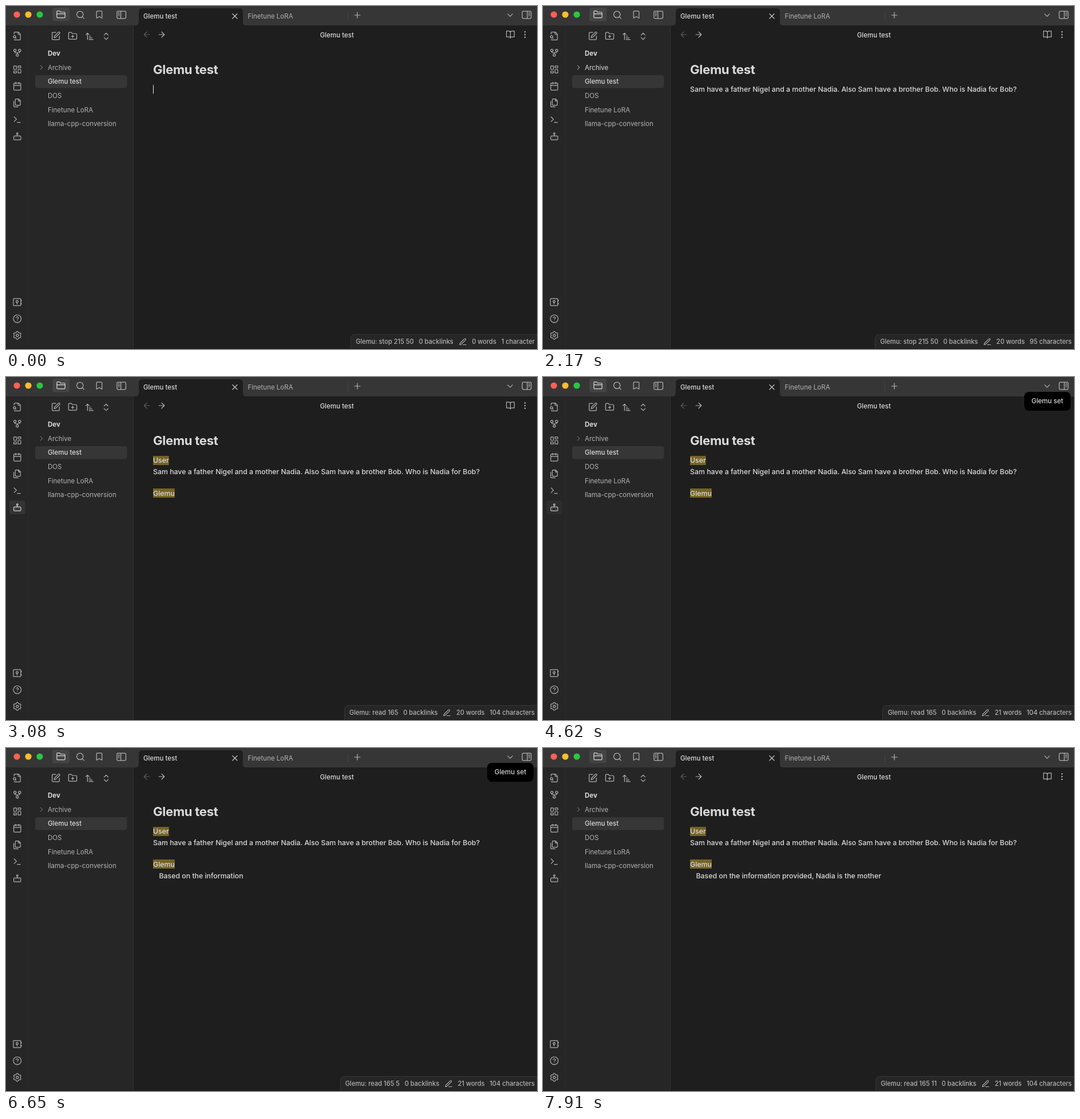
These frames come from a looping animation (928x600 px, 8000 ms). An HTML page:

```html
<!DOCTYPE html>
<html lang="en">
<head>
<meta charset="utf-8">
<title>Notes</title>
<style>
  html, body { margin: 0; width: 100%; height: 100%; overflow: hidden; background: #1e1e1e; }
  body, svg text { font-family: Inter, "Open Sans", sans-serif; }
  #stage { position: absolute; left: 0; top: 0; width: 928px; height: 600px; overflow: hidden; }
  svg { display: block; }
  text { white-space: pre; fill: #dadada; font-size: 11.5px; font-weight: 500; }
  .muted { fill: #b3b3b3; font-weight: 400; }
  .body { font-size: 12.3px; }
  .bold { font-weight: 700; }
  .title { font-size: 22.2px; font-weight: 700; letter-spacing: -.015em; }
  .icon { fill: none; stroke-width: 1.75; stroke-linecap: round; stroke-linejoin: round; }
  #status {
    position: absolute; right: 0; bottom: 1px; height: 24px; padding: 0 4px 0 8px;
    display: flex; align-items: center; gap: 8.7px; white-space: pre;
    background: #262626; border: solid #363636; border-width: 1px 0 0 1px;
    border-radius: 8px 0 0 0; color: #b3b3b3; font-size: 11.1px; font-weight: 500; line-height: 24px;
  }
  #toast {
    position: absolute; left: 841px; top: 26px; width: 81px; height: 33px;
    border-radius: 8px; background: #000; color: #dadada;
    font-size: 11.5px; font-weight: 500; line-height: 33px; text-align: center;
  }
</style>
</head>
<body>
<div id="stage">
  <svg id="scene" width="928" height="600" viewBox="0 0 928 600"></svg>
  <div id="status">
    <span id="state"></span><span id="links">0 backlinks</span>
    <svg id="pencil" width="15" height="15" viewBox="0 0 24 24"></svg>
    <span id="words"></span><span id="chars"></span>
  </div>
  <div id="toast">Glemu set</div>
</div>
<script>
const LOOP = 8000, STEP = 70;
const APP = 'Glemu';
const QUESTION = 'Sam have a father Nigel and a mother Nadia. Also Sam have a brother Bob. Who is Nadia for Bob?';
const TOKENS = ['', 'Based', ' on', ' the', ' information', ' provided', ',', ' Nadia', ' is', ' the', ' mother'];
const TOKEN_TIMES = [5880, 6020, 6230, 6440, 6650, 6860, 7070, 7280, 7490, 7700, 7910];

const $ = id => document.getElementById(id);

// Path helpers on a 24-unit icon grid
const ring = (x, y, r) => `M${x - r} ${y}a${r} ${r} 0 1 0 ${2 * r} 0a${r} ${r} 0 1 0 ${-2 * r} 0`;
const box = (x, y, w, h, r) =>
  `M${x + r} ${y}h${w - 2 * r}q${r} 0 ${r} ${r}v${h - 2 * r}q0 ${r} ${-r} ${r}h${2 * r - w}q${-r} 0 ${-r} ${-r}v${2 * r - h}q0 ${-r} ${r} ${-r}z`;
const gear = () => {
  const points = Array.from({ length: 72 }, (_, i) => {
    const a = i * Math.PI / 36;
    const r = 8.9 + 1.2 * Math.tanh(1.6 * Math.cos(6 * a));
    return `${(12 + r * Math.sin(a)).toFixed(2)} ${(12 - r * Math.cos(a)).toFixed(2)}`;
  });
  return `M${points.join('L')}Z${ring(12, 12, 3)}`;
};
const folder = 'M20 20a2 2 0 0 0 2-2V8a2 2 0 0 0-2-2h-7.9a2 2 0 0 1-1.7-.9L9.6 3.9A2 2 0 0 0 7.9 3H4a2 2 0 0 0-2 2v13a2 2 0 0 0 2 2Z';

const ICONS = {
  fileSearch: 'M14 2v4a2 2 0 0 0 2 2h4M4.3 21a2 2 0 0 0 1.7 1H18a2 2 0 0 0 2-2V7l-5-5H6a2 2 0 0 0-2 2v3M9 18l-1.5-1.5' + ring(5, 14, 3),
  fork: ring(12, 18, 3) + ring(6, 6, 3) + ring(18, 6, 3) + 'M18 9v2c0 .6-.4 1-1 1H7c-.6 0-1-.4-1-1V9M12 12v3',
  dashboard: box(3, 3, 7, 9, 1) + box(14, 3, 7, 5, 1) + box(14, 12, 7, 9, 1) + box(3, 16, 7, 5, 1),
  calendar: box(3, 4, 18, 18, 2) + 'M16 2v4M8 2v4M3 10h18',
  files: 'M15.5 2H8.6Q7 2 7 3.6v12.8Q7 18 8.6 18h9.8q1.6 0 1.6-1.6V6.5ZM3 7.6v12.8Q3 22 4.6 22h9.8M15 2v5h5',
  terminal: 'M4 17l6-6-6-6M12 19h8',
  bot: box(3, 11, 18, 10, 2) + ring(12, 5, 2) + 'M12 7v4M8 16v.01M16 16v.01',
  vault: box(2, 3, 19, 18, 1.5) + ring(11.5, 10.5, 2.6) + 'M11.5 13.2v3.6M22.5 7v2M22.5 15v2',
  help: ring(12, 12, 10) + 'M9.1 9a3 3 0 0 1 5.8 1c0 2-2.9 3-2.9 3M12 17h.01',
  gear: gear(),
  folder: folder + 'M2 10h20',
  folderPlus: folder + 'M12 10v6M9 13h6',
  search: ring(11, 11, 8) + 'M21 21l-4.3-4.3',
  bookmark: 'M19 21l-7-4-7 4V5a2 2 0 0 1 2-2h10a2 2 0 0 1 2 2Z',
  panelLeft: box(1, 3, 22, 18, 2.5) + 'M10.5 3v18M4.5 7h2.5M4.5 10.5h2.5M4.5 14h2.5',
  panelRight: box(1, 3, 22, 18, 2.5) + 'M13.5 3v18M17 7h2.5M17 10.5h2.5M17 14h2.5',
  edit: 'M12 3H5a2 2 0 0 0-2 2v14a2 2 0 0 0 2 2h14a2 2 0 0 0 2-2v-7M18.4 2.6a2.1 2.1 0 0 1 3 3L12 15l-4 1 1-4Z',
  sort: 'M3 8l4-4 4 4M7 4v16M11 12h4M11 16h7M11 20h10',
  upDown: 'M7 15l5 5 5-5M7 9l5-5 5 5',
  left: 'M12 19l-7-7 7-7M19 12H5',
  right: 'M12 5l7 7-7 7M5 12h14',
  book: 'M2 3h6a4 4 0 0 1 4 4v14a3 3 0 0 0-3-3H2ZM22 3h-6a4 4 0 0 0-4 4v14a3 3 0 0 1 3-3h7Z',
  more: ring(12, 5, 1) + ring(12, 12, 1) + ring(12, 19, 1),
  close: 'M18 6L6 18M6 6l12 12',
  plus: 'M12 5v14M5 12h14',
  down: 'M6 9l6 6 6-6',
  chevron: 'M9 18l6-6-6-6',
  pencil: 'M12 20h9M16.5 3.5a2.1 2.1 0 0 1 3 3L7 19l-4 1 1-4Z'
};

const icon = (name, x, y, size = 16.4, color = '#b3b3b3') =>
  `<path id="icon-${name}" class="icon" stroke="${color}" d="${ICONS[name]}" transform="translate(${x - size / 2} ${y - size / 2}) scale(${size / 24})"/>`;
const rect = (x, y, w, h, fill, extra = '') =>
  `<rect x="${x}" y="${y}" width="${w}" height="${h}" fill="${fill}" ${extra}/>`;
const text = (x, y, content, cls = '', extra = '') =>
  `<text x="${x}" y="${y}" class="${cls}" ${extra}>${content}</text>`;

const windowFrame = [
  rect(0, 0, 928, 600, '#1e1e1e'),
  rect(0, 34, 222, 566, '#262626'),
  rect(39, 34, 1, 566, '#2b2b2b'),
  rect(222, 34, 1, 566, '#363636'),
  rect(0, 0, 928, 34, '#363636'),
  '<path fill="#1e1e1e" d="M226 34q6 0 6-6V10q0-6 6-6H408q6 0 6 6V28q0 6 6 6z"/>',
  ...['#ff5f57', '#febc2e', '#28c840'].map((c, i) => `<circle cx="${19 + 20 * i}" cy="15" r="5.6" fill="${c}"/>`),
  rect(81, 3, 30, 23.5, '#444', 'rx="4"'),
  rect(597, 10, 1, 15, '#444')
];

const toolbars = [
  icon('folder', 96, 15, 17, '#dadada'), icon('search', 130, 15.5, 17),
  icon('bookmark', 163, 15), icon('panelLeft', 201.7, 15.5, 17),
  icon('close', 400, 17.7, 16.4, '#dadada'), icon('plus', 614, 16, 17),
  icon('down', 881, 16, 17), icon('panelRight', 910, 15.5, 17),
  icon('edit', 87, 52.5, 17), icon('folderPlus', 116.5, 52.5, 17),
  icon('sort', 146, 53, 17), icon('upDown', 175, 53, 17),
  icon('left', 246, 50, 16.4, '#5c5c5c'), icon('right', 272, 50),
  icon('book', 881.5, 50), icon('more', 907, 50),
  rect(6, 216, 27.5, 24, '#fff', 'id="botHover" rx="4" opacity="0"'),
  ...['fileSearch', 'fork', 'dashboard', 'calendar', 'files', 'terminal', 'bot']
    .map((name, i) => icon(name, 19.7, 52.5 + 29.25 * i)),
  ...['vault', 'help', 'gear'].map((name, i) => icon(name, 19.7, 518 + 29.1 * i))
];

const fileList = [
  rect(51, 121, 160.5, 22.5, '#363636', 'rx="4"'),
  icon('chevron', 62, 107.5, 14, '#7f7f7f'),
  text(73, 87.2, 'Dev', 'bold'),
  text(73, 111.8, 'Archive', 'muted', 'id="archive"'),
  text(73, 136.4, APP + ' test'),
  text(73, 161, 'DOS', 'muted', 'id="dos"'),
  text(73, 185.6, 'Finetune LoRA', 'muted'),
  text(73, 210.2, 'llama-cpp-conversion', 'muted')
];

const note = [
  text(240, 22, APP + ' test'),
  text(422.5, 22, 'Finetune LoRA', 'muted'),
  text(578.3, 54.5, APP + ' test', '', 'text-anchor="middle"'),
  text(257, 119.3, APP + ' test', 'title'),
  '<g id="chat">',
  rect(257, 138, 28, 16, '#756427', 'id="userMark"'),
  rect(257, 195, 40, 16, '#756427', 'id="appMark"'),
  text(257, 150, 'User', 'body', 'id="user"'),
  text(257, 207.6, APP, 'body', 'id="app"'),
  '</g>',
  text(257, 150, QUESTION, 'body', 'id="question"'),
  text(267.5, 227.6, '', 'body', 'id="answer"'),
  rect(257, 138, 1, 15.5, '#e6e6e6', 'id="caret"'),
  rect(0, 34, 1, 566, '#1a1c1d'), rect(0, 599, 928, 1, '#1a1a1a')
];

$('scene').innerHTML = [...windowFrame, ...toolbars, ...fileList, ...note].join('');
$('pencil').innerHTML = `<path class="icon" stroke="#b3b3b3" d="${ICONS.pencil}"/>`;
const questionWidth = $('question').getComputedTextLength();
for (const id of ['user', 'app']) $(id + 'Mark').setAttribute('width', $(id).getComputedTextLength());

const within = (t, from, to) => t >= from && t < to;
const show = (id, on) => $(id).style.display = on ? '' : 'none';
const label = (id, value) => { if ($(id).textContent !== value) $(id).textContent = value; };
const hoverFill = (id, on) => $(id).style.fill = on ? '#dadada' : '#b3b3b3';

function render(t) {
  const pasted = t >= 1260, chatting = t >= 3010;
  const tokens = TOKEN_TIMES.filter(at => t >= at).length;

  show('question', pasted);
  show('chat', chatting);
  $('question').setAttribute('y', chatting ? 169.8 : 150);
  label('answer', TOKENS.slice(0, tokens).join(''));
  show('caret', t < 280 || within(t, 770, 1820) || within(t, 2310, 2870));
  $('caret').setAttribute('x', pasted ? 257 + Math.round(questionWidth) : 257);

  label('state', `${APP}: ` + (t < 2940 ? 'stop 215 50' : 'read 165' + (tokens ? ' ' + tokens : '')));
  label('words', (t < 1470 ? 0 : t < 3220 ? 20 : 21) + ' words');
  label('chars', !pasted ? '1 character' : chatting ? '104 characters' : '95 characters');

  hoverFill('archive', within(t, 2170, 2310));
  $('icon-chevron').style.stroke = within(t, 2170, 2310) ? '#b3b3b3' : '#7f7f7f';
  hoverFill('dos', within(t, 2380, 2450));
  const hover = within(t, 2660, 4620) ? 1 : within(t, 2590, 4690) ? .5 : 0;
  $('botHover').setAttribute('opacity', .067 * hover);
  const tone = 179 + 39 * hover;
  $('icon-bot').style.stroke = `rgb(${tone},${tone},${tone})`;

  // The notice slides in from the right, then fades while drifting up
  const tick = Math.floor(t / STEP) * STEP;
  const enter = Math.min(1, (tick - 3080) / 210);
  const leave = Math.max(0, (tick - 7210) / 280);
  show('toast', enter > 0 && leave < 1);
  $('toast').style.transform = `translate(${90 * (1 - enter) ** 2}px, ${-10 * leave}px)`;
  $('toast').style.opacity = 1 - leave ** 2;
}

const start = performance.now();
function frame() {
  render((performance.now() - start) % LOOP);
  requestAnimationFrame(frame);
}
frame();
</script>
</body>
</html>
```
